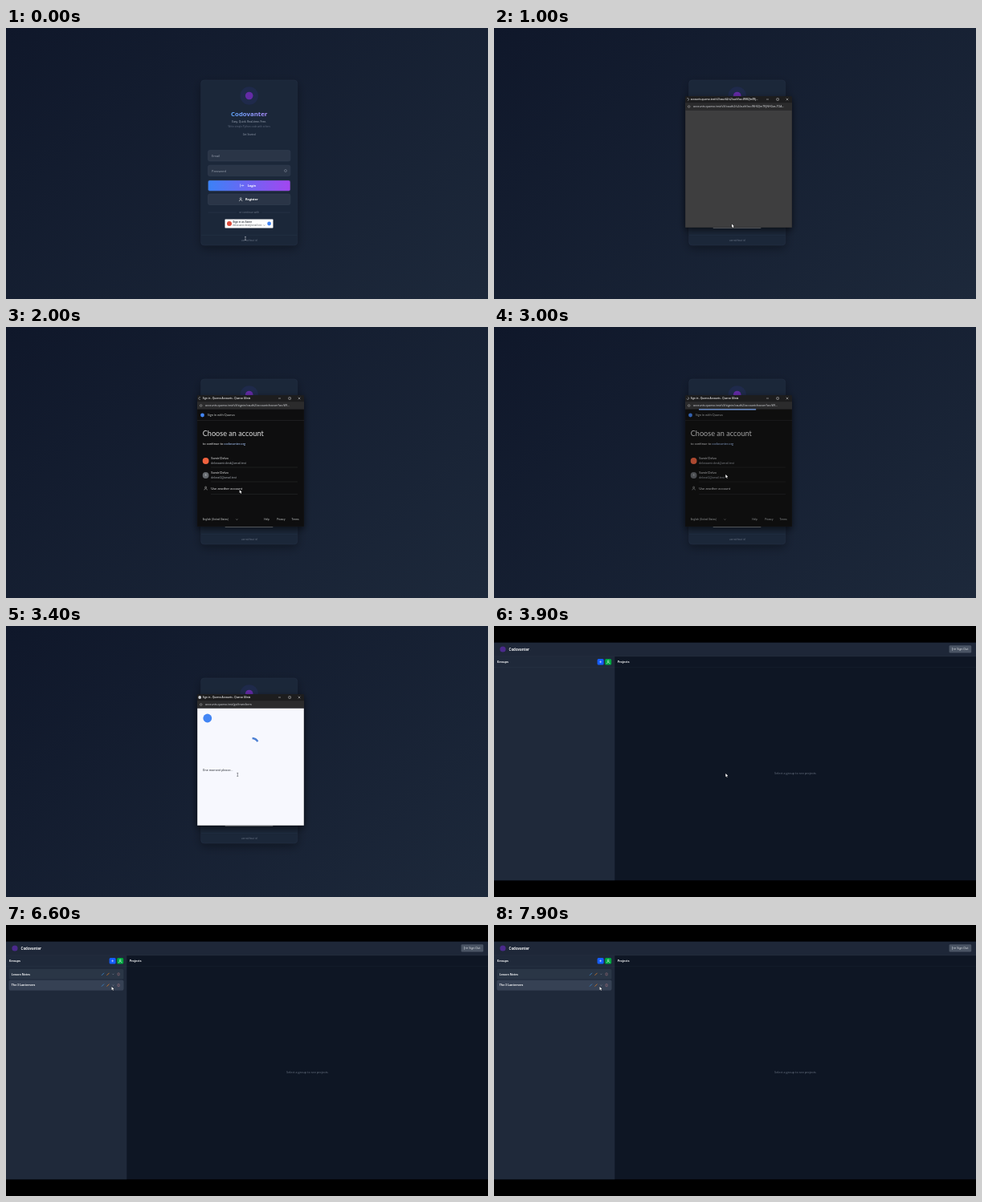
An HTML page with a canvas for the animation above (8 s loop, 600x338 px).

```html
<!DOCTYPE html>
<html lang="en">
<head>
<meta charset="utf-8">
<title>Login and groups</title>
<style>
html, body { margin: 0; width: 100%; height: 100%; overflow: hidden; background: #000; }
canvas { display: block; width: 100vw; height: 100vh; }
</style>
</head>
<body>
<canvas id="stage"></canvas>
<script>
const W = 600, H = 338, LOOP = 8000, STEP = 100;
const SANS = '"Open Sans", "Noto Sans", sans-serif';
const ROBOTO = 'Roboto, Arial, sans-serif';
const LATO = 'Lato, Roboto, sans-serif';
const APP = 'Codovanter', BRAND = 'Quorvo', USER = 'Samir Delvo';
const MAIL = 'delvosamir.desk@vmail.test', MAIL2 = 'delvost2@vmail.test';
const HOST = 'accounts.quorvo.test';

// Moments when the scene changes, in ms.
const OPEN = 500, CHOOSER = 1500, PICK = 2500, WAIT = 3400, CLOSE = 3500;
const DASH = 3900, ROWS = 4400, HOVER = 6100, EXPAND = 6700, COLLAPSE = 7900;

const canvas = document.getElementById('stage');
const ctx = canvas.getContext('2d');

function resize() {
  const dpr = window.devicePixelRatio || 1;
  canvas.width = Math.round(innerWidth * dpr);
  canvas.height = Math.round(innerHeight * dpr);
}
addEventListener('resize', resize);
resize();

// ---- helpers ----
const clamp01 = v => Math.max(0, Math.min(1, v));
const mix = (a, b, k) => a + (b - a) * k;
const tween = (t, from, to) => clamp01((t - from) / (to - from));
const ease = k => k * k * (3 - 2 * k);

function box(x, y, w, h, r, fill, stroke) {
  ctx.beginPath();
  ctx.roundRect(x, y, w, h, r);
  if (fill) { ctx.fillStyle = fill; ctx.fill(); }
  if (stroke) { ctx.strokeStyle = stroke; ctx.lineWidth = 0.5; ctx.stroke(); }
}

function shadowBox(x, y, w, h, r, fill, blur, alpha) {
  const scale = canvas.width / W;
  ctx.save();
  ctx.shadowColor = `rgba(0,0,0,${alpha})`;
  ctx.shadowBlur = blur * scale;
  ctx.shadowOffsetY = blur / 3 * scale;
  box(x, y, w, h, r, fill);
  ctx.restore();
}

function disc(x, y, r, fill) {
  ctx.beginPath();
  ctx.arc(x, y, r, 0, Math.PI * 2);
  ctx.fillStyle = fill;
  ctx.fill();
}

function ring(x, y, r, color, lw = 0.5, from = 0, sweep = Math.PI * 2) {
  ctx.beginPath();
  ctx.arc(x, y, r, from, from + sweep);
  ctx.strokeStyle = color;
  ctx.lineWidth = lw;
  ctx.stroke();
}

function line(x, y, x2, y2, color, lw = 0.5) {
  ctx.beginPath();
  ctx.moveTo(x, y);
  ctx.lineTo(x2, y2);
  ctx.strokeStyle = color;
  ctx.lineWidth = lw;
  ctx.stroke();
}

const rule = (x, x2, y, color) => line(x, y, x2, y, color);

function text(str, x, y, size, color, { weight = 400, align = 'left', font = SANS } = {}) {
  ctx.font = `${weight} ${size}px ${font}`;
  ctx.textAlign = align;
  ctx.fillStyle = color;
  ctx.fillText(str, x, y + size * 0.35);
}

function gradient(x, y, x2, y2, from, to) {
  const g = ctx.createLinearGradient(x, y, x2, y2);
  g.addColorStop(0, from);
  g.addColorStop(1, to);
  return g;
}

// ---- icons, each centred on x, y ----
function plus(x, y, r, color) {
  line(x - r, y, x + r, y, color);
  line(x, y - r, x, y + r, color);
}

function cross(x, y, r, color) {
  line(x - r, y - r, x + r, y + r, color);
  line(x - r, y + r, x + r, y - r, color);
}

function chevron(x, y, color) {
  line(x - 1, y - 0.5, x, y + 0.5, color);
  line(x, y + 0.5, x + 1, y - 0.5, color);
}

function doorArrow(x, y, color) {
  line(x - 2, y - 2, x - 2, y + 2, color);
  line(x - 1, y, x + 2, y, color);
  line(x + 1, y - 1, x + 2, y, color);
  line(x + 1, y + 1, x + 2, y, color);
}

function person(x, y, color) {
  ring(x, y - 1, 1, color);
  ring(x, y + 2.4, 1.8, color, 0.5, Math.PI, Math.PI);
}

// ---- login page ----
const CX = 302.7, FIELD_X = 251.5, FIELD_W = 102.4;

function field(y, label, fill = '#2a3547', border = '#354155') {
  box(FIELD_X, y, FIELD_W, 13.4, 2, fill, border);
  if (label) text(label, FIELD_X + 4.5, y + 7, 4, '#99a1af');
}

function button(y, label, icon, fill, border) {
  field(y, '', fill, border);
  icon(CX - 9 + (5 - label.length) / 2, y + 6.6, '#fff');
  text(label, CX + 3.2, y + 6.6, 3.9, '#fff', { weight: 700, align: 'center' });
}

function drawLogin() {
  ctx.fillStyle = gradient(85, -90, 515, 428, '#0f172a', '#1d293b');
  ctx.fillRect(0, 0, W, H);

  shadowBox(242.7, 65, 120, 206, 4, '#1b2739', 12, 0.35);
  box(242.7, 65, 120, 206, 4, null, '#263347');
  disc(CX, 84.5, 11.2, '#1f2a4b');
  disc(CX, 84.5, 4.8, '#642ba6');

  const center = { align: 'center' };
  text(APP, CX, 107.5, 7.8, gradient(281, 0, 324, 0, '#60a5fa', '#a78bfa'), { weight: 700, align: 'center' });
  text('Easy. Quick. Real-time. Free.', CX, 117, 3.3, '#a9b2c1', center);
  text('Write simple Python code with others', CX, 123, 3, '#626d80', center);
  text('Get Started', CX, 133.3, 3, '#959eae', center);

  field(152.6, 'Email');
  field(171.2, 'Password');
  ring(348, 178, 1.5, '#8b95a5');
  button(189.9, 'Login', doorArrow, gradient(FIELD_X, 0, FIELD_X + FIELD_W, 0, '#3b82f6', '#a346f0'));
  button(207.1, 'Register', person, '#2a3547', '#364255');

  rule(FIELD_X, 287, 230, '#2f3b4f');
  rule(318.5, FIELD_X + FIELD_W, 230, '#2f3b4f');
  text('or continue with', CX, 230, 3.3, '#6b7688', center);

  box(272.5, 238.5, 60, 10.9, 0.6, '#fff');
  disc(278, 244, 3, '#dd4a3a');
  text('Sign in as Samir', 282.3, 242, 3.3, '#333941', { weight: 500, font: ROBOTO });
  text(MAIL, 282.3, 246.1, 2.9, '#5f6368', { font: ROBOTO });
  chevron(321.4, 246, '#5f6368');
  disc(327.6, 244, 2.4, '#4285f4');

  rule(243, 362.5, 258.3, '#263347');
  text('use without id', CX, 265, 3, '#6b7688', center);
}

// ---- sign-in window ----
const WIN = { x: 238, y: 85, w: 133, h: 164, page: 102.7 };
const TEXT_X = 244.8;

function drawFrame(t, title, url) {
  shadowBox(WIN.x, WIN.y, WIN.w, WIN.h, 1.4, '#1d1d1e', 9, 0.6);
  box(WIN.x, 93.2, WIN.w, 9.5, 0, '#2b2b2c');
  if (t < WAIT) ring(241.2, 89, 1.4, '#d5d9df', 0.5, t / 100, 4.2);
  else disc(241.2, 89, 1.9, '#c9ccd1');
  text(title, TEXT_X, 89, 3, '#f0f0f0', { weight: 600 });
  rule(339, 342, 89, '#d8d8d8');
  box(351.8, 87.7, 2.6, 2.6, 0.3, null, '#d8d8d8');
  cross(365, 89, 1.3, '#d8d8d8');
  ring(242.7, 98, 1.3, '#b8b8b8');
  text(url, 248, 97.8, 3.5, '#dfe1e5');
}

function drawPage(color) {
  box(WIN.x + 0.2, WIN.page, WIN.w - 0.4, WIN.y + WIN.h - WIN.page - 0.3, 0, color);
}

function drawAccount(y, color, mail) {
  disc(248.6, y, 3.9, color);
  text(USER, 255.2, y - 3, 4.1, '#e3e3e3', { font: LATO });
  text(mail, 255.2, y + 3, 3.5, '#a5aab0', { font: ROBOTO });
  rule(255, 363, y + 8, '#2b2c2f');
}

function drawChooser(t) {
  const pale = '#c4c7c5', bright = '#e3e3e3', lead = 'to continue to ';
  drawPage('#0e0e0f');
  disc(244.5, 110, 2.4, '#4285f4');
  text(`Sign in with ${BRAND}`, 250.7, 110, 3.9, pale, { font: LATO });
  rule(WIN.x, WIN.x + WIN.w, 116.5, '#2c2d30');
  text('Choose an account', TEXT_X, 133, 9.1, bright, { font: LATO });
  text(lead, TEXT_X, 146, 4.1, bright, { font: LATO });
  text('codovanter.org', TEXT_X + ctx.measureText(lead).width, 146, 4.1, '#a8c7fa', { font: LATO });

  drawAccount(167, '#f0623f', MAIL);
  drawAccount(185, '#65696e', MAIL2);
  text(USER[0], 248.6, 185, 3.6, '#d8dadd', { font: ROBOTO, align: 'center' });
  person(248.6, 201, pale);
  text('Use another account', 255.2, 201.5, 4.3, bright, { font: LATO });
  rule(255, 363, 208.5, '#2b2c2f');

  text('English (United States)', TEXT_X, 240, 3.2, pale, { font: ROBOTO });
  chevron(287.4, 240, pale);
  ['Help', 'Privacy', 'Terms'].forEach((s, i) =>
    text(s, 324.5 + 17.8 * i, 240, 3.2, pale, { font: ROBOTO, align: 'center' }));

  // After the pick the page dims and a bar runs along its top.
  if (t < PICK) return;
  ctx.fillStyle = `rgba(14,14,15,${0.3 * tween(t, PICK - STEP, PICK + 200)})`;
  ctx.fillRect(WIN.x, WIN.page, WIN.w, WIN.y + WIN.h - WIN.page);
  const k = tween(t, PICK, WIN.page && WAIT);
  const from = WIN.w * k ** 3.5, to = WIN.w * k ** 0.7;
  box(WIN.x + from, 102.2, to - from, 1.4, 0, '#7ba6f0');
}

function drawWait(t) {
  drawPage('#f7f8fe');
  disc(250.8, 115, 5.4, '#4285f4');
  ring(306, 148.6, 8.6, '#4b7fd3', 2.4, -1.5 + (t - WAIT) / 106, 0.95);
  text('One moment please...', TEXT_X, 179.5, 3.9, '#33373d', { font: ROBOTO });
}

function drawPopup(t) {
  const show = ease(tween(t, OPEN, OPEN + 300)) * (1 - ease(tween(t, CLOSE, CLOSE + 200)));
  if (show <= 0) return;
  const scale = mix(0.92, 1, show), cx = WIN.x + WIN.w / 2, cy = WIN.y + WIN.h / 2;
  const title = `Sign in - ${BRAND} Accounts - ${BRAND} Glintz`;
  const auth = HOST + '/v3/oauth2/v2/auth?as=WHf2Jm7Rj';
  ctx.save();
  ctx.globalAlpha = show;
  ctx.translate(cx, cy);
  ctx.scale(scale, scale);
  ctx.translate(-cx, -cy);
  if (t < CHOOSER) {
    drawFrame(t, auth + '…', auth + 'NHGas-TOA…');
    drawPage('#3e3e3f');
  } else if (t < WAIT) {
    drawFrame(t, title, HOST + '/v3/signin/oauth2/accountchooser?as=Wf…');
    drawChooser(t);
  } else {
    drawFrame(t, title, HOST + '/gsi/transform');
    drawWait(t);
  }
  ctx.restore();
}

// ---- dashboard ----
const SIDE = 150.3, TOP = 20.7, BAR = 37.7, BOTTOM = 317.3;
const white = '#f3f4f6', bold = { weight: 700 };

function drawRow(y, h, name, hover) {
  box(3.6, y, 142.8, h, 1.6, '#2a3646');
  ctx.save();
  ctx.globalAlpha *= hover;
  box(3.6, y, 142.8, h, 1.6, '#364154');
  ctx.restore();
  const mid = y + 6.3;
  text(name, 6.8, mid, 3.5, white, bold);
  ['#3b82c4', '#c8762c'].forEach((c, i) =>
    line(119 + 6.5 * i, mid + 1.5, 122 + 6.5 * i, mid - 1.5, c, 0.9));
  chevron(133.4, mid, '#8b95a5');
  box(139, mid - 1.4, 2.2, 2.9, 0.4, null, '#b07880');
}

function drawDashboard(t) {
  ctx.fillStyle = '#000';
  ctx.fillRect(0, 0, W, H);
  box(0, TOP, W, BOTTOM - TOP, 0, '#0e1624');
  box(0, TOP, W, BAR - TOP, 0, '#1e2738');
  box(0, BAR, SIDE, BOTTOM - BAR, 0, '#1f293a');
  rule(0, W, BAR, '#2a3547');
  rule(0, SIDE, 51.4, '#2a3547');
  rule(SIDE, W, 51.4, '#182233');

  disc(11, 29, 3.6, '#4b2a8c');
  text(APP, 18.6, 29, 4.4, white, bold);
  box(566.6, 24.2, 27.6, 9.4, 1.4, '#4a5464');
  doorArrow(572.6, 28.8, '#dfe3e8');
  text('Sign Out', 576.3, 28.9, 3.6, '#e5e7eb');

  text('Groups', 3.8, 45, 4, white, bold);
  box(128.6, 41, 8, 7.6, 1.5, '#155dfc');
  plus(132.6, 44.8, 1.4, '#fff');
  box(138.2, 41, 8, 7.6, 1.5, '#00a63e');
  person(142.2, 44.8, '#fff');
  text('Projects', 153.7, 44.5, 3.7, white, bold);
  text('Select a group to see projects', 375, 184, 3.8, '#6a7484', { align: 'center' });

  if (t < ROWS) return;
  const open = t < COLLAPSE ? ease(tween(t, EXPAND, EXPAND + 500)) : 0;
  drawRow(55, 12.6, 'Lesson Notes', 0);
  drawRow(68.8, mix(12.6, 48.7, open), 'The 3 Lanterners', tween(t, HOVER, HOVER + 300));
}

// ---- cursor ----
const START = [298, 261];
const MOVES = [
  { from: 0, to: 400, x: 296, y: 244.5 },
  { from: CHOOSER, to: 2300, x: 288.3, y: 184 },
  { from: 4300, to: 6400, x: 131.5, y: 77 }
];

function drawCursor(t) {
  let [x, y] = START;
  for (const m of MOVES) {
    const k = ease(tween(t, m.from, m.to));
    x = mix(x, m.x, k);
    y = mix(y, m.y, k);
  }
  const overText = t < STEP || (t >= WAIT && t < CLOSE + 200);
  if (overText) {
    const color = t < STEP ? '#d5dae2' : '#33373d';
    line(x, y - 0.6, x, y + 3.4, color);
    rule(x - 0.9, x + 0.9, y - 0.6, color);
    rule(x - 0.9, x + 0.9, y + 3.4, color);
    return;
  }
  ctx.save();
  ctx.translate(x, y);
  ctx.fillStyle = '#fff';
  ctx.strokeStyle = '#111';
  ctx.lineWidth = 0.5;
  const arrow = new Path2D('M0 0V4L.9 3.2 1.6 4.7 2.3 4.4 1.7 3 2.9 2.8Z');
  ctx.stroke(arrow);
  ctx.fill(arrow);
  ctx.restore();
}

function draw(now) {
  const t = Math.floor(now % LOOP / STEP) * STEP;
  ctx.setTransform(canvas.width / W, 0, 0, canvas.height / H, 0, 0);
  if (t < DASH) {
    drawLogin();
    drawPopup(t);
  } else {
    drawDashboard(t);
  }
  drawCursor(t);
}

const start = performance.now();
function loop() {
  draw(performance.now() - start);
  requestAnimationFrame(loop);
}
loop();
</script>
</body>
</html>
```
